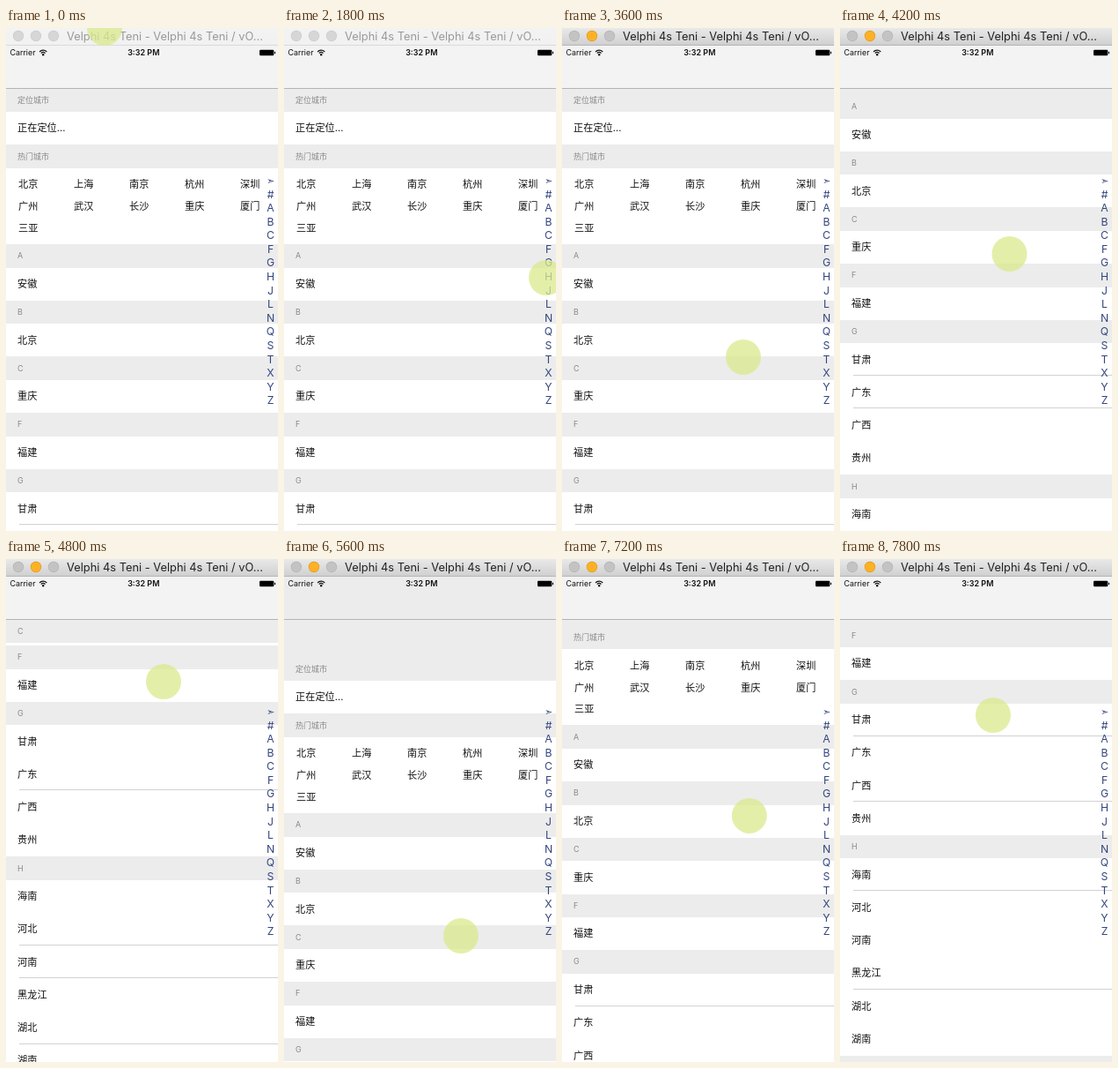
Animation of 309x570 px, one loop 8 s. Source, as an HTML page with a canvas:

```html
<!DOCTYPE html>
<html lang="zh">
<head>
<meta charset="utf-8">
<style>
html, body { margin: 0; width: 100%; height: 100%; overflow: hidden; background: #fff; }
canvas { display: block; width: 309px; height: 570px; }
</style>
</head>
<body>
<canvas id="stage" width="309" height="570"></canvas>
<script>
const ctx = document.getElementById('stage').getContext('2d');
const W = 309, H = 570, LOOP = 8000, STEP = 200;
const NAV = 68.65, HEAD = 26.47, ROW = 37.25, HOT = 86.2;
const GREY = '#ececec', INK = '#111';
const CJK = 'Inter, "Noto Sans CJK SC", "Noto Sans CJK", sans-serif';
const UI = 'Inter, Roboto, sans-serif';
const DEVICE = 'Velphi 4s Teni';

const hotCities = ['北京 上海 南京 杭州 深圳', '广州 武汉 长沙 重庆 厦门', '三亚'].map(s => s.split(' '));
const sections = [
  ['定位城市', '正在定位...'],
  ['热门城市', null],
  ['A', '安徽'],
  ['B', '北京'],
  ['C', '重庆'],
  ['F', '福建'],
  ['G', '甘肃 广东 广西 贵州'],
  ['H', '海南 河北 河南 黑龙江 湖北 湖南'],
  ['J', '江苏 江西 吉林']
].map(([title, rows]) => ({ title, rows: rows && rows.split(' ') }));

let end = NAV;
for (const s of sections) {
  s.top = end;
  end += HEAD + (s.rows ? s.rows.length * ROW : HOT);
}

// Each gesture eases the pointer and the list to a new state.
const home = { x: 112, y: 0, scroll: 0 };
const gestures = [
  { from: 0, to: 1800, x: 298, y: 283, scroll: 0 },
  { from: 1800, to: 3600, x: 206, y: 373, scroll: 0 },
  { from: 3600, to: 4800, x: 179, y: 139, scroll: 338 },
  { from: 4800, to: 5600, x: 201, y: 427, scroll: -43 },
  { from: 5600, to: 6350, x: 220, y: 312, scroll: 0 },
  { from: 7000, to: 7800, x: 174, y: 177, scroll: 362.5 }
];

function ease(t, from, to) {
  const u = Math.min(1, Math.max(0, (t - from) / (to - from)));
  return u * u * (3 - 2 * u);
}

function stateAt(t) {
  const now = { ...home };
  for (const g of gestures) {
    const k = ease(t, g.from, g.to);
    for (const key in now) now[key] += (g[key] - now[key]) * k;
  }
  return now;
}

function box(x, y, w, h, color) {
  const top = Math.round(y);
  ctx.fillStyle = color;
  ctx.fillRect(x, top, w, Math.round(y + h) - top);
}

function disc(x, y, r, color) {
  ctx.beginPath();
  ctx.arc(x, y, r, 0, Math.PI * 2);
  ctx.fillStyle = color;
  ctx.fill();
}

// y is the vertical centre of the glyphs
function text(str, x, y, size, color, { font = CJK, weight = 400, align = 'left' } = {}) {
  ctx.font = `${weight} ${size}px ${font}`;
  ctx.textAlign = align;
  ctx.fillStyle = color;
  ctx.fillText(str, x, y + size * (font === CJK ? 0.33 : 0.36));
}

// Hairlines survive the downscaling only at some positions.
function hairline(y) {
  const phase = y / 0.7536 + 0.33;
  if (phase - Math.floor(phase) < 0.5) {
    ctx.fillStyle = '#d2d2d2';
    ctx.fillRect(15, Math.floor(y - 0.9), W - 15, 1);
  }
}

function drawRows({ rows }, y) {
  if (!rows) {
    hotCities.forEach((line, r) => line.forEach((name, c) =>
      text(name, 14 + c * 63, y + 18.8 + r * 24.9, 11.2, INK)));
    return;
  }
  rows.forEach((name, i) => {
    text(name, 13, y + (i + 0.5) * ROW, 11.2, INK);
    if (i < rows.length - 1) hairline(y + (i + 1) * ROW);
  });
}

function drawList(scroll) {
  box(0, 0, W, H, '#fff');
  for (const s of sections) drawRows(s, s.top - scroll + HEAD);
  if (scroll < 0) box(0, NAV, W, -scroll, GREY);
  sections.forEach((s, i) => {
    const next = sections[i + 1] ? sections[i + 1].top - scroll : H * 2;
    const y = Math.max(s.top - scroll, Math.min(NAV, next - HEAD));
    if (y > H || y + HEAD < NAV) return;
    box(0, y, W, HEAD, GREY);
    text(s.title, 13, y + HEAD / 2, 9, '#8a8a8a');
  });
}

function drawIndex() {
  const style = { font: UI, align: 'center' };
  [...'➣#ABCFGHJLNQSTXYZ'].forEach((c, i) =>
    text(c, 300.5, 172.6 + i * 15.58, i ? 12.2 : 11, '#34467f',
      i ? style : { ...style, font: '"DejaVu Sans", sans-serif' }));
}

function drawNav(scroll) {
  box(0, 20, W, 48, scroll < -20 ? GREY : '#f3f3f3');
  box(0, 68, W, 1, '#b4b4b4');
  text('Carrier', 4.5, 28, 8.9, INK, { font: UI });
  text('3:32 PM', 156.3, 28, 9, INK, { font: UI, weight: 600, align: 'center' });

  ctx.strokeStyle = INK;
  ctx.lineWidth = 1.2;
  for (const r of [3.2, 5.6]) {
    ctx.beginPath();
    ctx.arc(42.2, 30.8, r, -Math.PI * 0.76, -Math.PI * 0.24);
    ctx.stroke();
  }
  disc(42.2, 30.2, 1.2, INK);

  ctx.fillStyle = '#000';
  ctx.beginPath();
  ctx.roundRect(288, 24.8, 16.3, 6.4, 1.2);
  ctx.fill();
  ctx.fillRect(305, 26.8, 1, 2.4);
}

function drawTitleBar(active) {
  const fill = ctx.createLinearGradient(0, 0, 0, 20);
  fill.addColorStop(0, active ? '#e9e9e9' : '#f3f3f3');
  fill.addColorStop(1, active ? '#cfcfcf' : '#f1f1f1');
  box(0, 0, W, 20, fill);
  box(0, 19, W, 1, active ? '#b5b5b5' : '#dadada');
  const ring = active ? '#b3b3b3' : '#cccccc';
  const grey = active ? '#c3c3c3' : '#d6d6d6';
  for (let i = 0; i < 3; i++) {
    const amber = active && i === 1;
    disc(14 + i * 20, 9, 6.2, amber ? '#dd9a22' : ring);
    disc(14 + i * 20, 9, 5.6, amber ? '#fdb125' : grey);
  }
  text(`${DEVICE} - ${DEVICE} / vO...`, 69, 9.5, 12.85, active ? '#222' : '#999', { font: UI });
}

function draw(now) {
  const t = Math.floor((now % LOOP) / STEP) * STEP;
  const { x, y, scroll } = stateAt(t);
  drawList(scroll);
  drawIndex();
  drawNav(scroll);
  drawTitleBar(t >= 3000);
  disc(x, y, 20, 'rgba(218,234,143,0.76)');
}

const start = performance.now();
function tick() {
  draw(performance.now() - start);
  requestAnimationFrame(tick);
}
tick();
</script>
</body>
</html>
```
